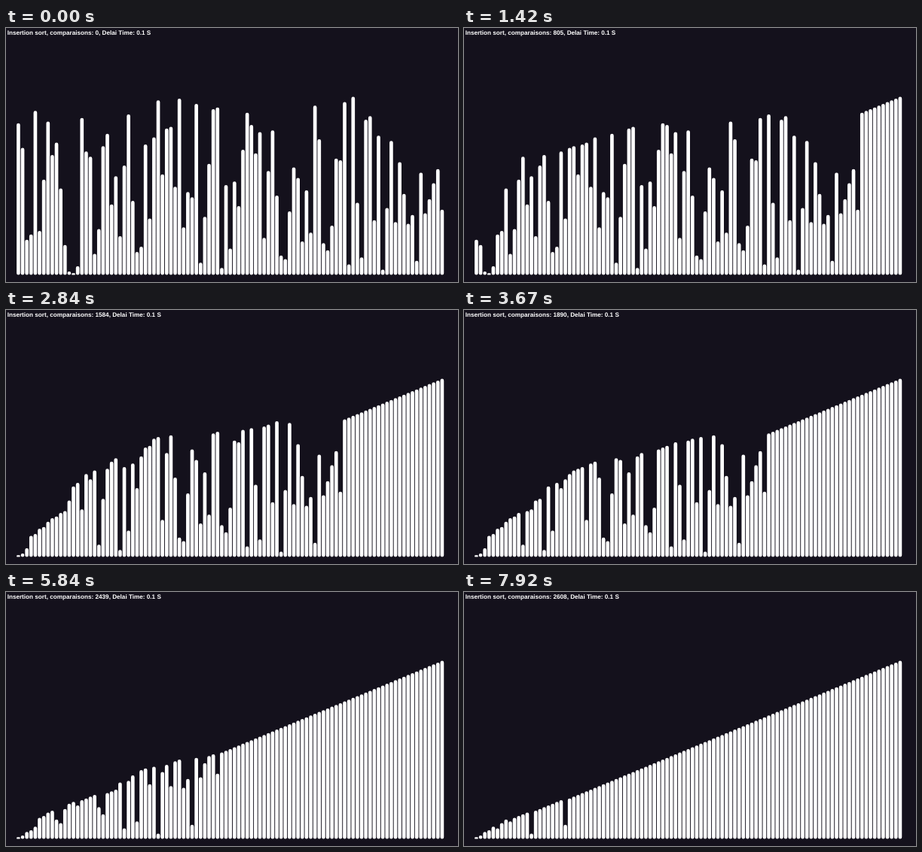
Animation, 600 px wide and 338 px high, one loop 8000 ms. Source, as an HTML page with a canvas:

```html
<!DOCTYPE html>
<html lang="en">
<head>
<meta charset="utf-8">
<title>Sorting bars</title>
<style>
  html, body { margin: 0; height: 100%; overflow: hidden; background: #14111c; }
  canvas { display: block; width: 100vw; height: 100vh; }
</style>
</head>
<body>
<canvas id="stage" width="600" height="338"></canvas>
<script>
const ctx = document.getElementById('stage').getContext('2d');
const LOOP = 8000;
const WIDTH = 1280, HEIGHT = 720;   // drawing units, scaled to the canvas
const FLOOR = 700, LEFT = 30, PITCH = 12, BAR = 10, UNIT = 5;

const shuffled = [
  86, 72, 20, 23, 93, 25, 54, 87, 68, 75, 49, 17, 2, 1, 5, 89, 70, 67, 12, 26,
  73, 80, 40, 56, 22, 62, 91, 42, 13, 16, 74, 32, 78, 99, 57, 83, 84, 50, 100, 27,
  47, 44, 97, 7, 33, 63, 94, 95, 4, 51, 15, 53, 39, 71, 92, 85, 69, 81, 21, 59,
  82, 45, 11, 9, 36, 61, 55, 19, 48, 24, 96, 77, 18, 14, 28, 66, 65, 98, 6, 101,
  41, 10, 88, 90, 31, 79, 3, 38, 76, 30, 64, 46, 29, 34, 8, 58, 35, 43, 52, 60, 37
];

// Ticks come 12 per second; sorting starts after FIRST and rests on these ticks.
const FIRST = 5;
const rests = [10, 15, 21, 25, 31, 35, 41, 46, 51, 57, 61, 67, 71, 77, 83, 87, 93];

function sweep({ bars, swaps }) {
  bars = bars.slice();
  for (let i = 1; i < bars.length; i++) {
    if (bars[i - 1] > bars[i]) {
      [bars[i - 1], bars[i]] = [bars[i], bars[i - 1]];
      swaps++;
    }
  }
  return { bars, swaps };
}

const states = [{ bars: shuffled, swaps: 0 }];
while (states.length < 80) states.push(sweep(states[states.length - 1]));

function passesAt(time) {
  const tick = Math.floor(Math.floor(time / 10) * 3 / 25);
  return Math.max(0, tick - FIRST - rests.filter(rest => rest <= tick).length);
}

function draw({ bars, swaps }) {
  ctx.setTransform(600 / WIDTH, 0, 0, 338 / HEIGHT, 0, 0);
  ctx.fillStyle = '#14111c';
  ctx.fillRect(0, 0, WIDTH, HEIGHT);
  ctx.fillStyle = '#fff';
  ctx.beginPath();
  bars.forEach((value, i) => {
    const height = value * UNIT;
    ctx.roundRect(LEFT + i * PITCH, FLOOR - height, BAR, height, Math.min(5, height / 2));
  });
  ctx.fill();
  ctx.font = 'bold 17.4px "Liberation Sans", Arial, sans-serif';
  ctx.textRendering = 'geometricPrecision';
  ctx.fillText(`Insertion sort, comparaisons: ${swaps}, Delai Time: 0.1 S`, 3.5, 19);
}

const start = performance.now();
function frame() {
  draw(states[passesAt((performance.now() - start) % LOOP)]);
  requestAnimationFrame(frame);
}
frame();
</script>
</body>
</html>
```
